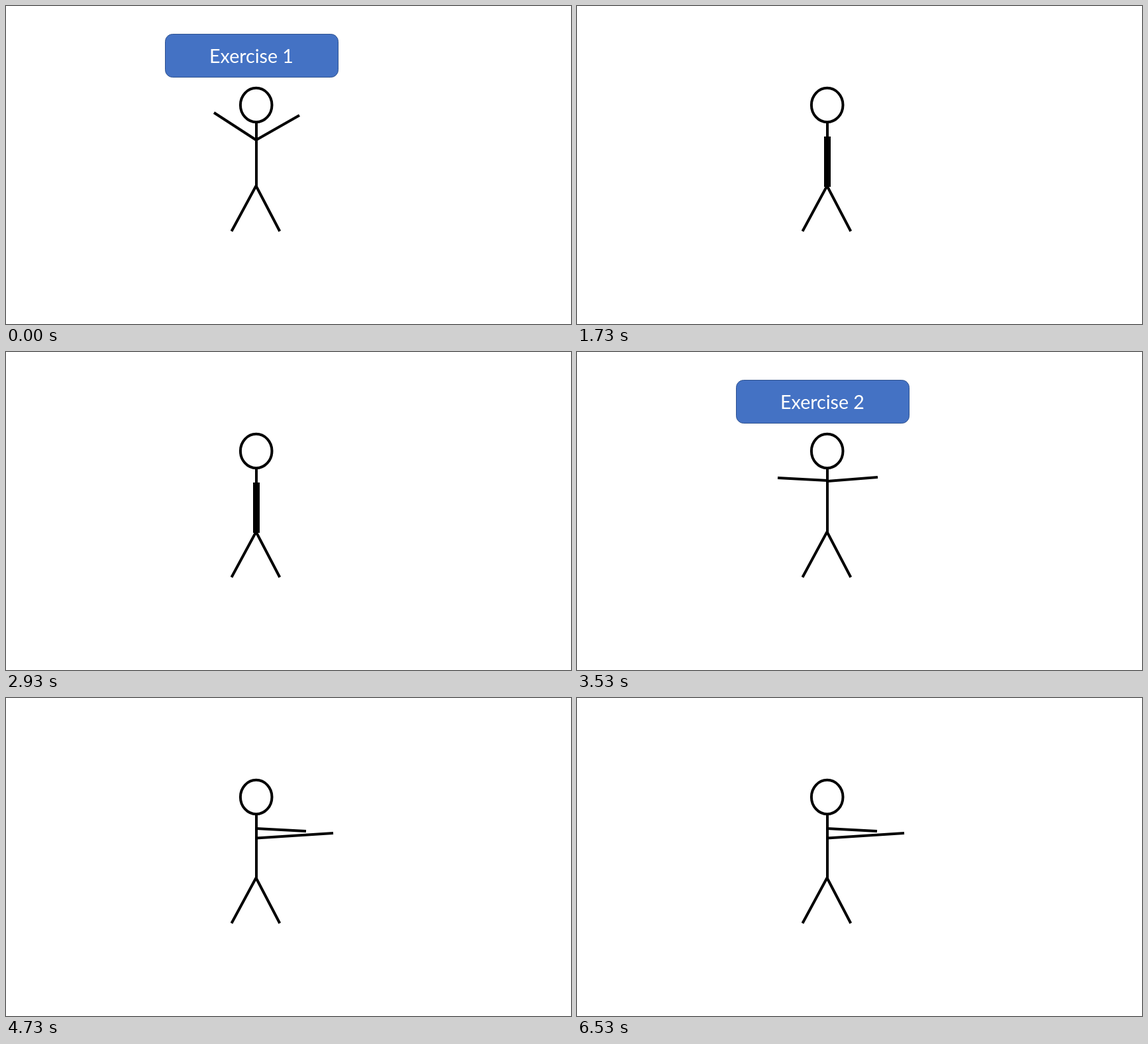
These frames come from a looping animation (853x480 px, 7.13 s). An HTML page:

```html
<!DOCTYPE html>
<html lang="en">
<head>
<meta charset="utf-8">
<title>Arm exercises</title>
<style>
  html, body { margin: 0; width: 100%; height: 100%; overflow: hidden; background: #fff; }
  svg { display: block; width: 100vw; height: 100vh; }
  text { font: 28.6px Lato, "Open Sans", sans-serif; fill: #fff; text-anchor: middle; }
  .body { fill: none; stroke: #000; stroke-width: 4; }
</style>
</head>
<body>
<svg viewBox="0 0 853 480">
  <g id="banner">
    <rect x="240.5" y="42.5" width="261" height="65" rx="11" fill="#4472c4" stroke="#2f528f"/>
    <text id="label" x="370.5" y="86">Exercise 1</text>
  </g>
  <g class="body">
    <ellipse cx="377.7" cy="149.5" rx="23.8" ry="25.7"/>
    <path d="M378 175V272M377.5 271.5L340.5 340M377.5 271.5L413.3 340"/>
    <path id="arms"/>
  </g>
</svg>
<script>
  const LOOP = 7130, FIRST = 530, STEP = 600;
  const banner = document.getElementById("banner");
  const label = document.getElementById("label");
  const arms = document.getElementById("arms");

  const poses = {
    up: "M314 161L378 202.5M378 202L443 165",
    down: "M375 197V273M381 197V273M378 197V273",
    out: "M303 190L378 194M378 195L454 189",
    left: "M303 195L378 190.3M262 197L378 204.5",
    right: "M378 197L453 201M378 211.5L494 204"
  };
  const steps = [
    "up", "down", "up", "down", "up", "down",
    "out", "left", "right", "out", "left", "right"
  ];
  const titles = { 0: "Exercise 1", 6: "Exercise 2" };

  function draw(time) {
    const t = time % LOOP;
    const i = t < FIRST ? 0 : 1 + Math.floor((t - FIRST) / STEP);
    arms.setAttribute("d", poses[steps[i]]);
    banner.style.display = titles[i] ? "" : "none";
    label.textContent = titles[i] || "";
  }

  const start = performance.now();
  function tick() {
    draw(performance.now() - start);
    requestAnimationFrame(tick);
  }
  draw(0);
  requestAnimationFrame(tick);
</script>
</body>
</html>
```
